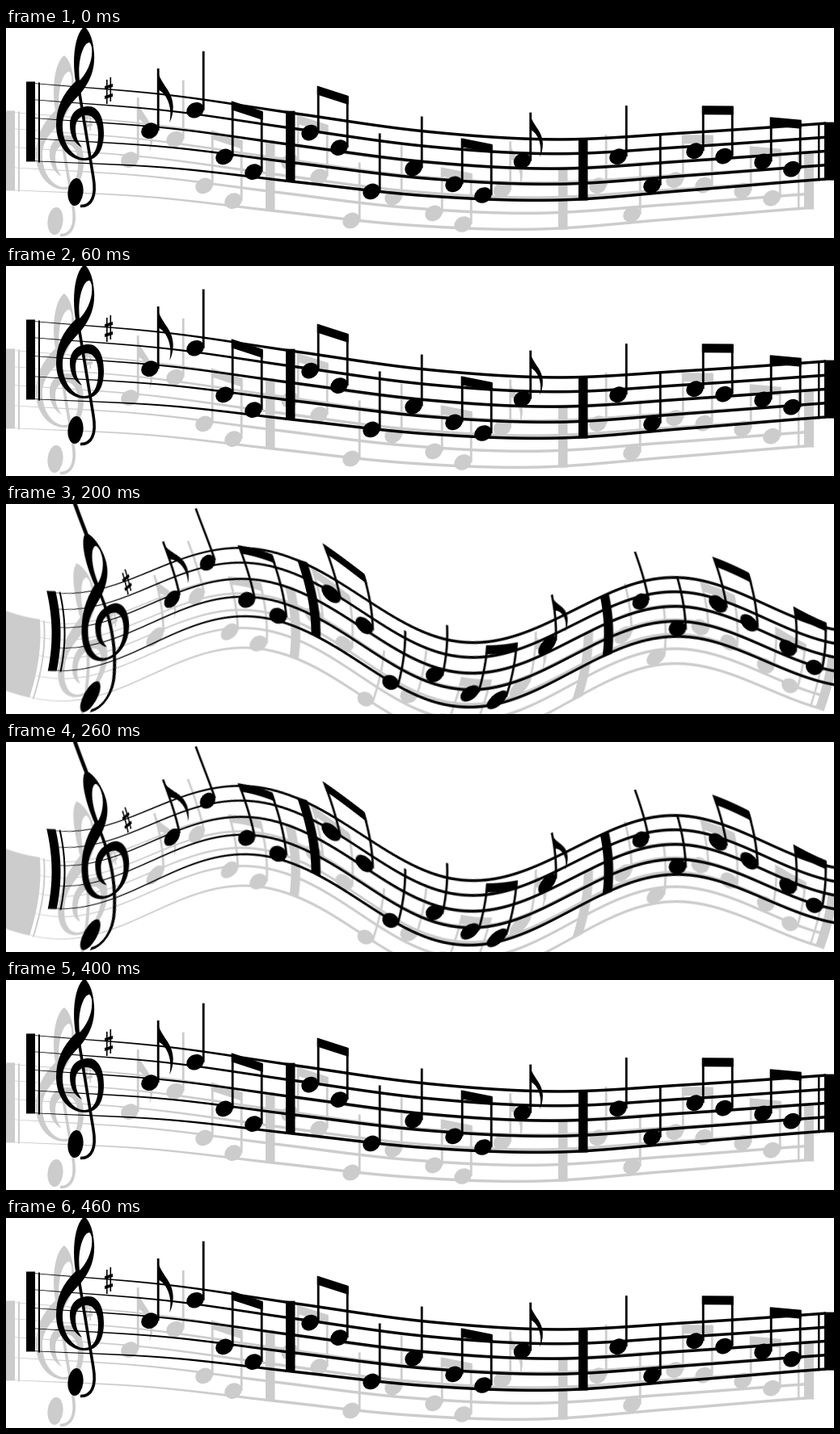
Animation, 1024 px wide and 260 px high, one loop 500 ms. Source, as an HTML page with a canvas:

```html
<!DOCTYPE html>
<html>
<head>
<meta charset="utf-8">
<title>Waving sheet music</title>
<style>
html, body { margin: 0; width: 100%; height: 100%; overflow: hidden; background: #fff; }
canvas { display: block; }
</style>
</head>
<body>
<canvas id="stage" width="1024" height="260"></canvas>
<script>
const W = 1024, H = 260;
const stage = document.getElementById('stage').getContext('2d');
const sheet = Object.assign(document.createElement('canvas'), { width: W, height: H });
const g = sheet.getContext('2d');
const { cos, floor } = Math;
const clamp = (v, max) => Math.max(0, Math.min(max, v));

const CLEF = new Path2D(`M97 -2C86 6 81 36 86 66C70 82 62 98 62 120
  C62 146 78 164 98 164C112 164 121 152 121 130C121 110 114 97 102 97
  C88 97 79 106 79 120C79 134 85 143 94 148C88 140 86 133 86 124
  C86 114 92 108 100 108C108 108 114 116 114 132C114 150 108 161 97 161
  C82 161 70 142 70 122C70 100 84 92 96 76C106 62 110 48 109 32
  C108 16 104 4 97 -2Z
  M103 18C96 18 88 40 91 65C100 56 108 40 106 24C105 20 104 18 103 18Z`);
const CLEF_STEM = new Path2D('M88 63L108 185C112 208 106 221 92 220.5');
const FLAG = new Path2D('M-1 0C2 20 18 26 18.5 47C18.5 55 17 61 14 67C18 50 12 32 0 26Z');

// Heights of the staff's middle at even steps from LEFT
const MIDDLE = [117, 128, 148.5, 168, 175.5, 165.5, 153.5];
const LEFT = 40, STEP = 160;

function spline(p, u) {
  const i = clamp(floor(u), p.length - 2), t = u - i;
  const b = p[i], c = p[i + 1], a = p[i - 1] ?? 2 * b - c, d = p[i + 2] ?? 2 * c - b;
  return b + t / 2 * (c - a + t * (2 * a - 5 * b + 4 * c - d + t * (3 * (b - c) + d - a)));
}

// Height on the staff: part 0 is the top line, 1 the bottom line
function staffY(x, part) {
  const u = (x - LEFT) / STEP;
  const height = 69 + 27 * clamp(1 - u / 6, 1) ** 1.35;
  return spline(MIDDLE, u) + height * (part - .5);
}

function ellipse(x, y, rx, ry, turn) {
  g.beginPath();
  g.ellipse(x, y, rx, ry, turn, 0, 7);
  g.fill();
}

// Slanted bar with upright ends
function slab(x1, y1, x2, y2, thick) {
  g.beginPath();
  g.moveTo(x1, y1);
  g.lineTo(x2, y2);
  g.lineTo(x2, y2 + thick);
  g.lineTo(x1, y1 + thick);
  g.fill();
}

function drawLines() {
  for (let x = 36; x < 1014; x++) {
    const weight = Math.min(3.5, .7 + (x - 36) * .0085);
    const lift = .055 * (1 - x / W);
    for (let s = 0; s <= 1; s += .25) {
      g.fillRect(x, staffY(x, s - 4 * lift * s * (1 - s)) - weight / 2, 1, weight);
    }
  }
}

function bar(x, width) {
  const top = staffY(x, 0) - 1.5;
  g.fillRect(x, top, width, staffY(x, 1) + 1.5 - top);
}

function drawClef() {
  g.fill(CLEF, 'evenodd');
  g.lineWidth = 3.6;
  g.stroke(CLEF_STEM);
  ellipse(86, 203, 9.5, 17, .1);
}

function drawSharp() {
  g.fillRect(124, 64, 1.6, 30);
  g.fillRect(128.5, 61, 1.6, 30);
  for (const y of [72, 84]) slab(122, y, 132, y - 3, 4);
}

// Draws a note and returns the end of its stem; degree counts half spaces down
function note(x, stem, degree) {
  const y = staffY(x, degree / 8);
  ellipse(x, y, 11.2, 9.4, -.5);
  g.fillRect(x + 8.8, y - stem, 2.8, stem);
  return [x + 10.2, y - stem];
}

function flagged(x, stem, degree, size) {
  g.save();
  g.translate(...note(x, stem, degree));
  g.scale(size, size);
  g.fill(FLAG);
  g.restore();
}

function pair(x, stem, first, second) {
  const [x1, y1] = note(x, stem, first);
  const [x2, y2] = note(x + 36, stem + 6, second);
  slab(x1 - 1.4, y1 - 1, x2 + 1.4, y2 - 1, 11);
}

function drawScore(color, dx, dy) {
  g.fillStyle = g.strokeStyle = color;
  g.setTransform(1, 0, 0, 1, dx, dy);
  drawLines();
  drawClef();
  drawSharp();

  bar(25, 11);
  bar(40, 2);
  flagged(178, 77, 4.1, 1);
  note(234, 73, 1.3);
  pair(270, 68, 6.1, 7.4);
  bar(346, 11.5);
  pair(376, 57, 2, 3.3);
  note(452, 72, 8.1);
  note(504, 64, 4.7);
  pair(554, 56, 6.3, 7.5);
  flagged(638.5, 60, 2.9, .82);
  bar(708, 11.5);
  note(757, 63, 2.6);
  note(799, 64, 6.9);
  pair(852, 55, 2.6, 3.6);
  pair(936, 54, 4.8, 6.2);
  bar(1004, 2.5);
  bar(1012, 12);
}

g.fillStyle = '#fff';
g.fillRect(0, 0, W, H);
drawScore('#ccc', -25, 36);
drawScore('#000', 0, 0);
const flat = g.getImageData(0, 0, W, H);

// Shift rows by shiftX(y) and columns by shiftY(x); edge pixels smear outward
function wave(shiftX, shiftY) {
  const out = new ImageData(W, H), src = flat.data;
  const at = (x, y) => src[4 * (y * W + x)];
  const mix = (a, b, t) => a + (b - a) * t;
  for (let x = 0; x < W; x++) {
    const dy = shiftY(x);
    for (let y = 0; y < H; y++) {
      const u = clamp(x - shiftX(y), W - 1), v = clamp(y - dy, H - 1);
      const x0 = floor(u), y0 = floor(v), fx = u - x0;
      const x1 = Math.min(x0 + 1, W - 1), y1 = Math.min(y0 + 1, H - 1);
      const k = 4 * (y * W + x);
      out.data.fill(mix(mix(at(x0, y0), at(x1, y0), fx), mix(at(x0, y1), at(x1, y1), fx), v - y0), k, k + 3);
      out.data[k + 3] = 255;
    }
  }
  return out;
}

const gentle = wave(y => 26 * cos((y - 190) / 97),
                    x => 39.5 * cos((x + 30) / 925) * cos((x - 68) / 100));
const strong = wave(y => 31.5 * cos((y - 160) / 82.5),
                    x => 41.5 * cos((x - 61) / 80));
const poses = [flat, gentle, strong, gentle, flat];

const start = performance.now();
function tick() {
  const t = (performance.now() - start) % 500;
  stage.putImageData(poses[floor(t / 100)], 0, 0);
  requestAnimationFrame(tick);
}
tick();
</script>
</body>
</html>
```
